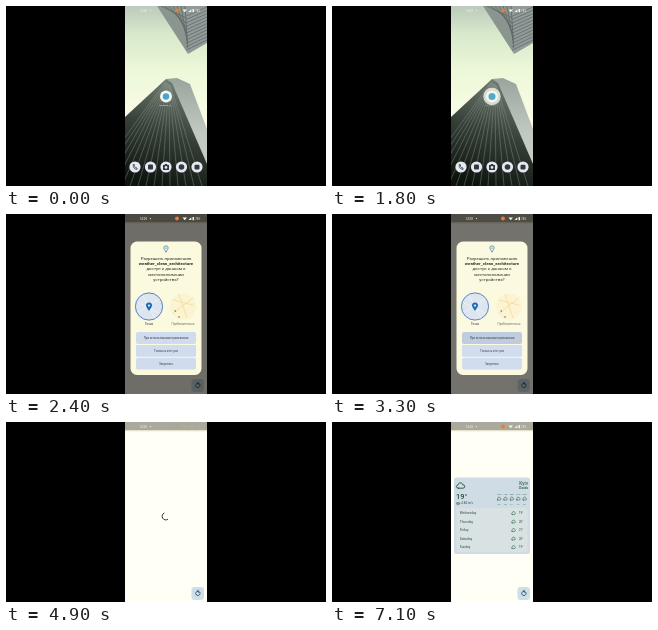
These frames come from a looping animation (320 px wide and 180 px high, 7.7 s). An HTML page:

```html
<!DOCTYPE html>
<html lang="en">
<head>
<meta charset="utf-8">
<title>Weather app launch</title>
<style>
html, body { margin: 0; width: 100%; height: 100%; overflow: hidden; background: #000; }
#phone { position: absolute; left: 119px; top: 0; width: 82px; height: 180px; overflow: hidden; }
.layer, .layer svg { position: absolute; left: 0; top: 0; width: 82px; height: 180px; }
svg { display: block; font-family: Roboto, "Open Sans", sans-serif; }
.anim { animation: 7.7s linear infinite both; }
.mid { text-anchor: middle; }
.end { text-anchor: end; }
.line { fill: none; stroke-linecap: round; stroke-linejoin: round; }

#label { animation-name: label; }
#app { animation-name: launch; animation-timing-function: cubic-bezier(.2, 0, .2, 1); }
#splash { animation-name: splash; }
#busy { animation-name: busy; animation-timing-function: step-end; }
#card { animation-name: card; }
#ask { animation-name: ask; }
#press { animation-name: press; }
#icons { animation-name: icons; }
#pill { animation-name: pill; transform-box: fill-box; transform-origin: 100% 50%; }

@keyframes label { 0%, 22.1% { opacity: 1 } 24.6%, 100% { opacity: 0 } }
@keyframes launch {
  0%, 22% { clip-path: inset(84.5px 35px 83.5px 35px round 6px); opacity: 0 }
  23.3% { clip-path: inset(82px 32.5px 81px 32.5px round 8.5px); opacity: .8 }
  27.9%, 100% { clip-path: inset(0 0 0 0 round 0); opacity: 1 }
}
@keyframes splash { 0%, 25.9% { opacity: 1 } 27.2%, 100% { opacity: 0 } }
@keyframes busy { 0% { visibility: hidden } 25.9% { visibility: visible } 68.8%, 100% { visibility: hidden } }
@keyframes card { 0%, 68.7% { opacity: 0 } 68.8%, 100% { opacity: 1 } }
@keyframes ask { 0%, 27.2% { opacity: 0 } 29.8%, 42.8% { opacity: 1 } 45%, 100% { opacity: 0 } }
@keyframes press { 0%, 41.5% { opacity: 0 } 42.8%, 100% { opacity: .1 } }
@keyframes icons { 0%, 61% { opacity: 1 } 63.6%, 87% { opacity: .08 } 90.9%, 100% { opacity: 1 } }
@keyframes pill {
  0%, 64.9% { opacity: 0; transform: scaleX(.2) }
  69%, 83% { opacity: 1; transform: none }
  87% { opacity: 1; transform: scaleX(.3) }
  89%, 100% { opacity: 0; transform: scaleX(.2) }
}
</style>
</head>
<body>
<div id="phone">
  <div class="layer">
    <svg viewBox="119 0 82 180">
      <defs>
        <linearGradient id="sky" x1="0" y1="0" x2="0" y2="1">
          <stop offset="0" stop-color="#bccabb"/>
          <stop offset=".15" stop-color="#d7e8cb"/>
          <stop offset=".35" stop-color="#ecf8d8"/>
          <stop offset=".65" stop-color="#fbfce6"/>
        </linearGradient>
        <linearGradient id="face" x1="0" y1="0" x2="0" y2="1">
          <stop offset="0" stop-color="#9aa49e"/>
          <stop offset=".5" stop-color="#c0c9c0"/>
          <stop offset="1" stop-color="#ccd3c8"/>
        </linearGradient>
        <linearGradient id="dark" x1=".6" y1="0" x2=".35" y2="1">
          <stop offset="0" stop-color="#737e76"/>
          <stop offset=".5" stop-color="#353f37"/>
          <stop offset="1" stop-color="#0d140e"/>
        </linearGradient>
      </defs>
      <rect x="119" width="82" height="180" fill="url(#sky)"/>
      <path d="M151 0H180V13L182 48Z" fill="#8a958f"/>
      <path d="M180 0H201V37L182 48L179 13Z" fill="#929b9a"/>
      <path id="slats" class="line" stroke="#59645f" stroke-width=".7"/>
      <path d="M160 73L171 72L184 78L201 123V180H160Z" fill="url(#face)"/>
      <path d="M160 73L119 111V180H201V158L166 77Z" fill="url(#dark)"/>
      <path id="ribs" class="line" stroke="#8b978d" stroke-width=".7" opacity=".6"/>
      <circle cx="160" cy="90.5" r="6" fill="#f4f7f4"/>
      <circle cx="160" cy="90.5" r="3.2" fill="#46a5cf"/>
      <text id="label" class="mid anim" x="160" y="100" font-size="2.5" fill="#eee">weather_cl…</text>
      <g fill="#e3eaf2" id="dock"></g>
      <path class="line" d="M127.2 158.8Q126.8 163 131 163.4L131 162L129.7 161.6L128.5 160.5L128.4 159Z" stroke="#303a40" stroke-width=".8"/>
      <g fill="#303a40">
        <rect x="142" y="158.5" width="5" height="5" rx="1"/>
        <path d="M157 159H158.5L159 158H161L161.5 159H163V164H157Z"/>
        <circle cx="175.5" cy="161" r="2.8"/>
        <rect x="188.5" y="158.8" width="5" height="4.6" rx="1"/>
      </g>
      <circle cx="160" cy="161.4" r="1.3" fill="#e3eaf2"/>
    </svg>
  </div>

  <div class="layer anim" id="app">
    <svg viewBox="119 0 82 180">
      <rect x="119" width="82" height="180" fill="#fffff5"/>
      <rect x="119" width="82" height="8.5" fill="#aaa99b"/>
      <rect x="119" y="8.5" width="82" height="1" fill="#f3f0cc"/>
      <g id="busy" class="anim">
        <path id="arc" class="line" stroke="#30363a" stroke-width="1" style="stroke-linecap:butt"/>
      </g>
      <g id="card" class="anim">
        <rect x="122" y="55.5" width="76" height="76.5" rx="2.5" fill="#d0dce5"/>
        <rect x="124.5" y="86" width="71" height="44" rx="2" fill="#d8e2e2"/>
        <path class="line" d="M126.3 66.2H131Q133 66 132.8 64.2Q132.4 62.7 130.8 62.8Q130 60.2 127.7 60.8Q126 61.4 126 63.1Q124.2 63.4 124.3 64.8Q124.7 66.2 126.3 66.2Z" stroke="#24543c" stroke-width=".9"/>
        <g fill="#24483a">
          <text x="124" y="76.6" font-size="7.4" font-weight="500">19°</text>
          <text x="129.3" y="82.4" font-size="2.9">4.84 m/s</text>
          <text class="end" x="196" y="62.8" font-size="4.8">Kyiv</text>
          <text class="end" x="196" y="67.4" font-size="3" font-weight="700" fill="#286a40">Clouds</text>
        </g>
        <path class="line" d="M124.6 80.6H127.4M124.2 81.6H128M125 82.6H127" stroke="#24543c" stroke-width=".5"/>
        <g id="hours" fill="#2f6847" font-size="2.5"></g>
        <g id="days" fill="#2b4a3b" font-size="3.2"></g>
      </g>
      <rect x="185.5" y="165" width="12.5" height="13" rx="3.2" fill="#cddfe8"/>
      <path class="line" d="M190.1 170A2.2 2.2 0 1 0 193.2 169.6L191.3 169.2M192.3 168L191.1 169.2L192.3 170.4" stroke="#214b53" stroke-width=".8"/>
      <g id="splash" class="anim">
        <rect x="119" width="82" height="180" fill="#f4f5ea"/>
        <circle cx="160" cy="90.5" r="3.6" fill="#55a9c9"/>
      </g>
    </svg>
  </div>

  <div class="layer anim" id="ask">
    <svg viewBox="119 0 82 180">
      <rect x="119" width="82" height="180" fill="#060500" opacity=".58"/>
      <rect x="124.5" y="27.5" width="71" height="133.5" rx="6.5" fill="#fbf9de"/>
      <path class="line" d="M160 37.8Q157.7 35 157.8 34A2.2 2.2 0 0 1 162.2 34Q162.2 35 160 37.8Z" stroke="#2774a8" stroke-width=".7"/>
      <circle cx="160" cy="34.1" r=".7" fill="#2774a8"/>
      <g class="mid" font-size="4.4" fill="#28291f">
        <text x="160" y="45.7">Разрешить приложению</text>
        <text x="160" y="51" font-weight="700">weather_clean_architecture</text>
        <text x="160" y="56.3">доступ к данным о</text>
        <text x="160" y="61.6">местоположении</text>
        <text x="160" y="66.9">устройства?</text>
      </g>
      <circle cx="143" cy="92.5" r="13.6" fill="#dce5f0" stroke="#3f78c4" stroke-width=".9"/>
      <path class="line" d="M132 89L153 99M137 82L149 104M133 98L153 85" stroke="#eef2f2" stroke-width="1"/>
      <path d="M143 97Q139.9 92.8 140 91.6A3 3 0 0 1 146 91.6Q146 92.8 143 97Z" fill="#1868b6"/>
      <circle cx="143" cy="91.6" r="1.1" fill="#eef2f4"/>
      <circle cx="177" cy="92.5" r="13" fill="#fbf4d2"/>
      <path class="line" d="M167 86L187 91M173 81L181 104M167 99L187 84" stroke="#f6d899" stroke-width=".8"/>
      <circle cx="169.3" cy="97" r=".8" fill="#65664d"/>
      <circle cx="173" cy="103" r=".8" fill="#65664d"/>
      <g fill="#d0dcee">
        <rect x="130" y="118" width="60" height="12" rx="2"/>
        <rect x="130" y="131" width="60" height="11.8" rx="1"/>
        <rect x="130" y="143.8" width="60" height="11.8" rx="2"/>
      </g>
      <rect id="press" class="anim" x="130" y="118" width="60" height="12" rx="2" fill="#12384c"/>
      <g class="mid" font-size="2.9" fill="#353d45">
        <text x="143" y="111.3" fill="#28291f">Точно</text>
        <text x="177" y="111.3" fill="#6c6b5c">Приблизительно</text>
        <text x="160" y="125">При использовании приложения</text>
        <text x="160" y="137.9">Только в этот раз</text>
        <text x="160" y="150.7">Запретить</text>
      </g>
    </svg>
  </div>

  <div class="layer">
    <svg viewBox="119 0 82 180">
      <g fill="#f5f4e6">
        <text x="133.5" y="5.6" font-size="3">14:28</text>
        <circle cx="144.5" cy="4.6" r=".6"/>
        <g id="icons" class="anim">
          <circle cx="171" cy="4.5" r="1.9" fill="#ec7a3c"/>
          <path d="M176.5 3.4H181L178.7 6.2ZM182.5 6L185.3 3.2V6Z"/>
          <rect x="186.5" y="3" width="1.6" height="3.2" rx=".3"/>
          <text x="189.3" y="5.6" font-size="2.7">74%</text>
        </g>
      </g>
      <g id="pill" class="anim">
        <rect x="184" y="1.3" width="13" height="6" rx="3" fill="#45d45a"/>
        <path d="M190.5 6.1Q189 4.2 189.1 3.7A1.4 1.4 0 0 1 191.9 3.7Q191.9 4.2 190.5 6.1Z" fill="#164f24"/>
      </g>
    </svg>
  </div>
</div>

<script>
const $ = id => document.getElementById(id);
const list = (n, fn) => Array.from({ length: n }, (_, i) => fn(i)).join('');
const cloud = (x, y) =>
  `<path class="line" d="M${x - 1.4} ${y + 1}h2.8q1.2-.9 0-1.8q-.6-1.6-1.8-1q-.8.3-.8 1q-1.3.6-.2 1.8z" stroke="#2c6543" stroke-width=".6"/>`;

$('slats').setAttribute('d', list(7, i => `M${155 + i * 4} 0L${180 + i * .3} ${12 + i * 5}`) +
  list(11, i => `M180.5 ${10 + i * 3.4}L201 ${1 + i * 3.3}`));
$('ribs').setAttribute('d', list(15, i => `M${159 + i * .4} ${76 + i * .3}L${84 + i * 8} 180`));
$('dock').innerHTML = list(5, i => `<circle cx="${129 + i * 15.5}" cy="161" r="5.6"/>`);

const hourTemps = [19, 18, 17, 17, 16];
$('hours').innerHTML = list(5, i => {
  const x = 167 + i * 6.4;
  return `<text class="mid" x="${x}" y="72.8">${18 + i}h</text>${cloud(x, 77)}` +
    `<text class="mid" x="${x}" y="82.5">${hourTemps[i]}°</text>`;
});

const days = ['Wednesday', 'Thursday', 'Friday', 'Saturday', 'Sunday'];
$('days').innerHTML = list(5, i => {
  const y = 91 + i * 8.5;
  return `<text x="127.8" y="${y + 1.1}">${days[i]}</text>${cloud(181.5, y + .4)}` +
    `<text x="187" y="${y + 1.1}" font-size="2.8">${[19, 20, 21, 20, 19][i]}°</text>`;
});

// Cubic ease (0.4, 0, 0.2, 1), solved by bisection
function ease(x) {
  if (x <= 0 || x >= 1) return x <= 0 ? 0 : 1;
  let lo = 0, hi = 1, u = .5;
  for (let i = 0; i < 20; i++) {
    u = (lo + hi) / 2;
    const v = 1 - u;
    if (1.2 * v * v * u + .6 * v * u * u + u ** 3 < x) lo = u; else hi = u;
  }
  return 3 * (1 - u) * u * u + u ** 3;
}

// Indeterminate ring: growing head, chasing tail, steady rotation
function drawArc(t) {
  const age = Math.max(0, t - 1927);
  const p = age % 1333 / 1333;
  const head = 270 * ease(p * 2), tail = 270 * ease(p * 2 - 1);
  const start = -90 + tail + p * 90 + age / 2222 * 360;
  const sweep = Math.max(1, head - tail);
  const at = deg => {
    const a = deg * Math.PI / 180;
    return `${(159.8 + 3.6 * Math.cos(a)).toFixed(2)} ${(94.3 + 3.6 * Math.sin(a)).toFixed(2)}`;
  };
  $('arc').setAttribute('d', `M${at(start)}A3.6 3.6 0 ${sweep > 180 ? 1 : 0} 1 ${at(start + sweep)}`);
}

let begin = null;
function tick(now) {
  begin ??= now;
  drawArc(Math.floor((now - begin) % 7700 / 100) * 100);
  requestAnimationFrame(tick);
}
requestAnimationFrame(tick);
</script>
</body>
</html>
```
